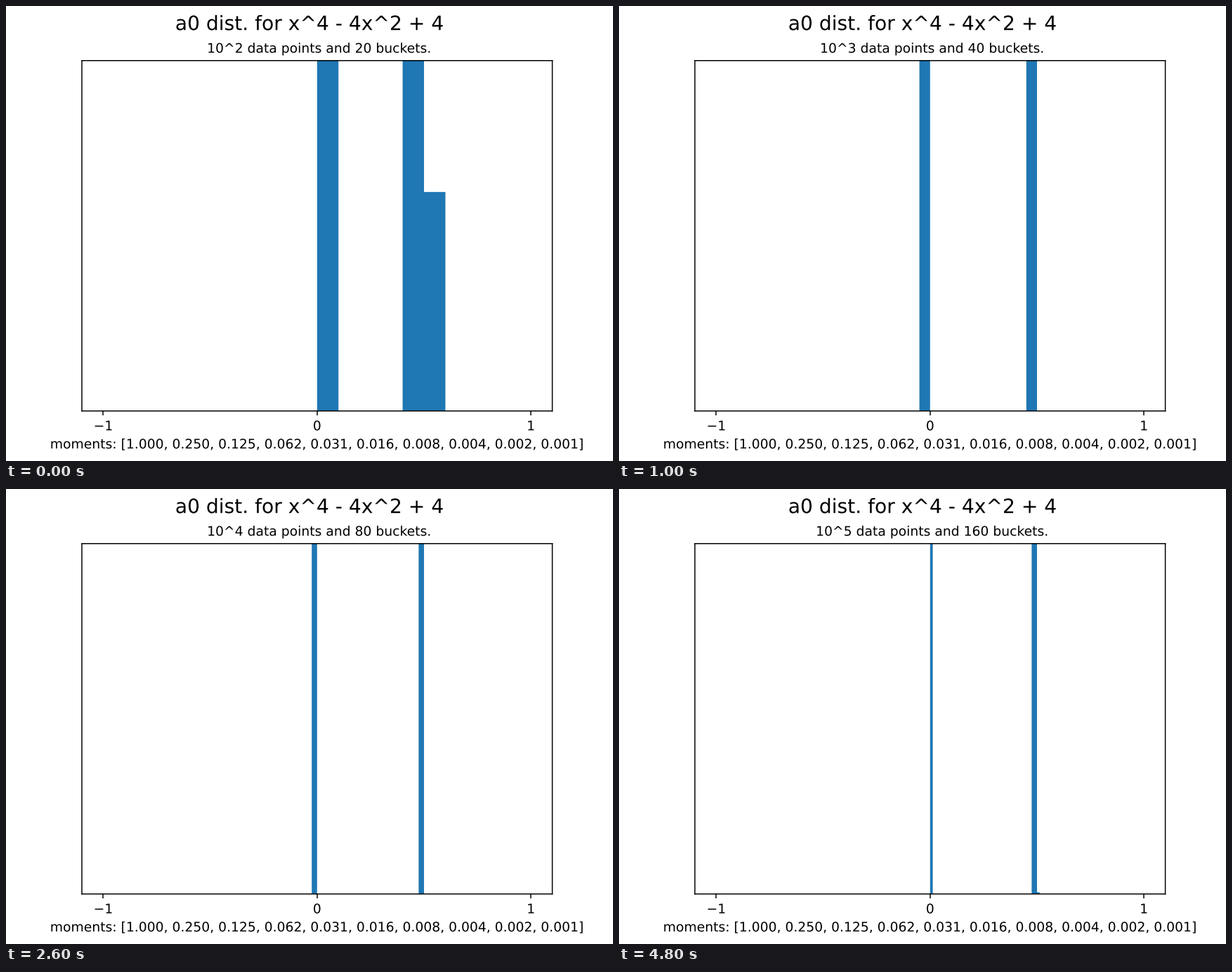
These frames come from a looping animation (864 by 648 pixels, 6 s). A matplotlib script:

```python
import matplotlib.pyplot as plt
import numpy as np
from matplotlib import patheffects
from matplotlib.animation import FuncAnimation

# Draw text, ticks and lines as smooth, unsnapped paths.
plt.rcParams.update({
    "font.family": "DejaVu Sans",
    "font.size": 10,
    "text.hinting": "none",
    "path.snap": False,
    "path.effects": [patheffects.Normal()],
})

LAST_STAGE = 3
LAST_HOLD = 3  # seconds the last stage stays
EXACT_HALVES = 6


def sample(power):
    """Half the values are 0; the rest lie just below 1/2, a few right on it."""
    half = 10 ** power // 2 - 2
    below = np.linspace(0.476, 0.499, half - EXACT_HALVES)
    return np.concatenate([np.zeros(half), below, np.full(EXACT_HALVES, 0.5)])


def histogram(stage):
    # Rounding in arange decides which bucket a value on an edge falls into.
    step = 0.1 / 2 ** stage
    edges = np.arange(-1, 1 + step / 2, step)
    return np.histogram(sample(stage + 2), edges, density=True)


fig, ax = plt.subplots(figsize=(6.4, 4.8), dpi=135)
fig.suptitle("a0 dist. for x^4 - 4x^2 + 4", fontsize=15)
title = ax.set_title("", fontsize=10)
moments = [np.mean([0.0 ** n, 0.5 ** n]) for n in range(10)]
ax.set_xlabel("moments: [" + ", ".join(f"{m:.3f}" for m in moments) + "]")
bars = ax.stairs(*histogram(0), fill=True, color="C0")
ax.set(xlim=(-1.1, 1.1), ylim=(0, 1), xticks=[-1, 0, 1], yticks=[])


def draw(second):
    stage = min(second, LAST_STAGE)
    title.set_text(f" 10^{stage + 2} data points and {20 * 2 ** stage} buckets.")
    bars.set_data(*histogram(stage))
    return title, bars


anim = FuncAnimation(fig, draw, frames=LAST_STAGE + LAST_HOLD,
                     interval=1000, repeat=True, repeat_delay=0)
plt.show()
```
